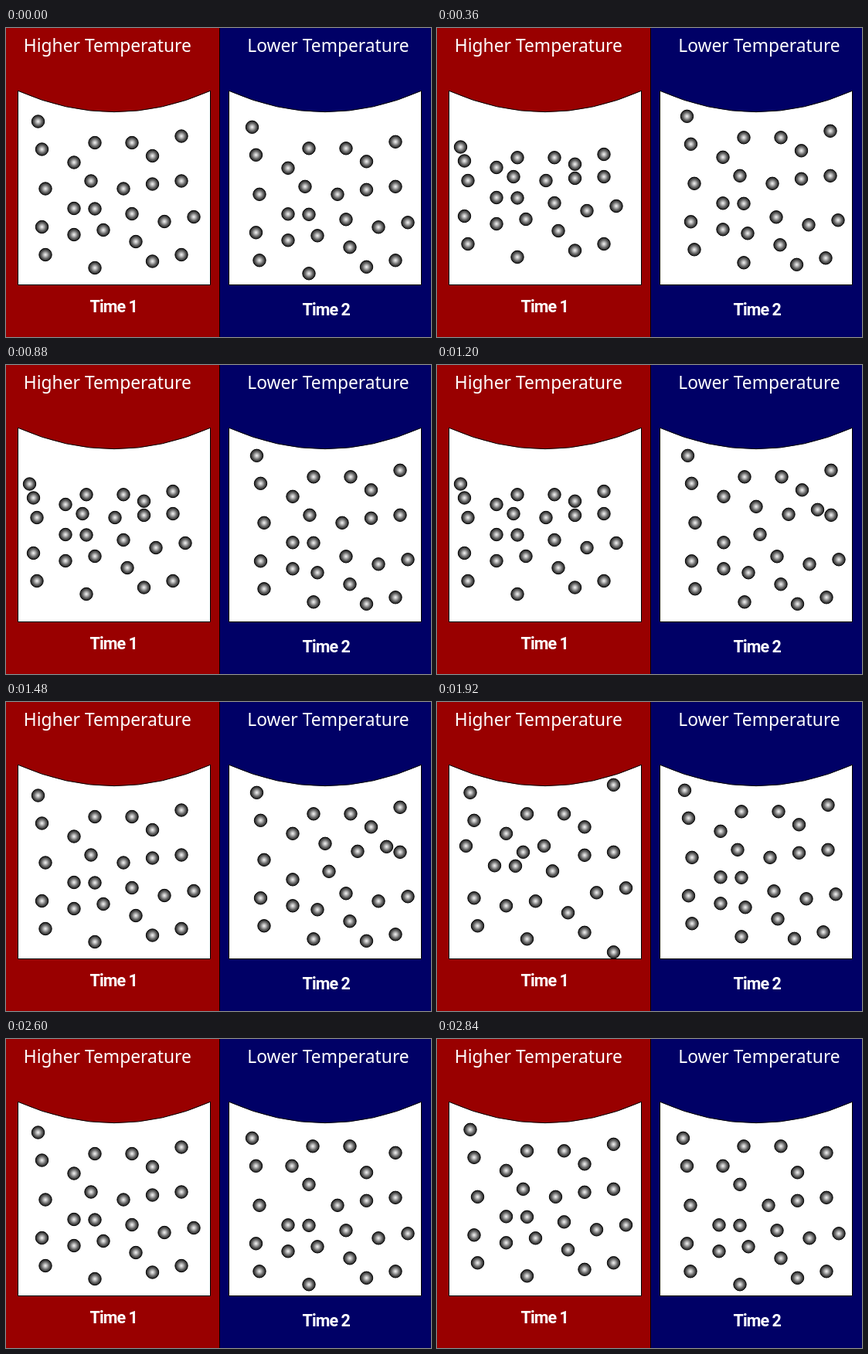
An HTML page that plays this animation: 550 by 400 pixels, repeating every 2.88 s.

```html
<!DOCTYPE html>
<html lang="en">
<head>
<meta charset="utf-8">
<title>Particles at two temperatures</title>
<style>
  html, body { margin: 0; width: 100%; height: 100%; overflow: hidden; }
  svg { display: block; width: 550px; height: 400px; }
  text { fill: #fff; }
  .title { font: 500 22.8px "Noto Sans", sans-serif; }
  .label { font: bold 21.5px Roboto, sans-serif; letter-spacing: -.9px; }
  .vessel { fill: #fff; stroke: #000; }
</style>
</head>
<body>
<svg viewBox="0 0 550 400">
  <defs>
    <radialGradient id="shade">
      <stop offset="0" stop-color="#f4f4f4"/>
      <stop offset=".25" stop-color="#c0c0c0"/>
      <stop offset=".65" stop-color="#606060"/>
      <stop offset="1" stop-color="#1c1c1c"/>
    </radialGradient>
    <path id="vessel" class="vessel" d="M.5 81.3Q125 136 249.5 81.3V332.5H.5Z"/>
  </defs>
  <rect width="276" height="400" fill="#900"/>
  <rect x="277" width="273" height="400" fill="#006"/>
  <rect x="276" width="1" height="400"/>
  <use href="#vessel" x="15"/>
  <use href="#vessel" x="288"/>
  <text class="title" x="22.8" y="30.5">Higher Temperature</text>
  <text class="title" x="312.3" y="30.5">Lower Temperature</text>
  <text class="label" x="108.5" y="368">Time 1</text>
  <text class="label" x="383.5" y="372">Time 2</text>
  <g id="hot"></g>
  <g id="cold" transform="translate(277 7.3)"></g>
</svg>
<script>
const FRAME = 40, FRAMES = 72;

// Starting layout, one column per row: x, then the heights on it.
const spread = [
  [41.5, 121], [46.5, 157, 257.5], [51, 208, 293.5],
  [88, 174, 233.5, 267.5], [110, 198], [115, 148.5, 234, 310.5],
  [126, 261.5], [152, 208], [163, 148.5, 240.5], [168, 276.5],
  [189.5, 165.5, 202, 302], [205, 250.5], [227, 140, 198, 293.5],
  [243, 244.5]
].flatMap(([x, ...heights]) => heights.map(y => [x, y]));

const everywhere = () => true;
const nudge = (pose, dx, dy, inside = everywhere) =>
  pose.map(([x, y]) => inside(x, y) ? [x + dx, y + dy] : [x, y]);

// Hot side: four poses in quick turn.
const raised = nudge(spread, 1.5, -3.7);
const crowded = spread.map(([x, y]) => [x - 11, y - 14 + Math.max(0, 215 - y) / 2]);
const swept = nudge(raised, -15, -18, (x, y) => x < 180 && y > 200 && y < 240);
const lowered = nudge(swept, 0, 34, (x, y) => x > 220 && y > 280);
const scattered = nudge(lowered, 0, -29, (x, y) => x > 220 && y < 150);
const hotCycle = [spread, crowded, raised, scattered];

// Cold side: each pose is held for a while.
const upperMiddle = (x, y) => x > 80 && x < 170 && y < 200;
const middle = (x, y) => x > 100 && x < 200 && y > 180 && y < 230;
const drifted = nudge(spread, 6, -11, (x, y) => x < 120 || y < 240);
const settled = nudge(drifted, -4, -3);
const coldSteps = [
  [0, spread],
  [5, nudge(drifted, -1, -3)],
  [14, settled],
  [18, drifted],
  [30, nudge(drifted, 20, -11, middle)],
  [43, settled],
  [57, nudge(spread, 22, -20, upperMiddle)],
  [65, nudge(spread, 5, -17, upperMiddle)]
];

function makeParticles(id) {
  const group = document.getElementById(id);
  return spread.map(() => {
    const dot = document.createElementNS(group.namespaceURI, "circle");
    dot.setAttribute("r", 8.2);
    dot.setAttribute("fill", "url(#shade)");
    dot.setAttribute("stroke", "#000");
    return group.appendChild(dot);
  });
}

function place(dots, pose) {
  dots.forEach((dot, i) => {
    dot.setAttribute("cx", pose[i][0]);
    dot.setAttribute("cy", pose[i][1]);
  });
}

const hot = makeParticles("hot"), cold = makeParticles("cold");
let shown = -1;

function draw() {
  const frame = Math.floor(performance.now() / FRAME) % FRAMES;
  if (frame !== shown) {
    shown = frame;
    // The hot side pauses for one frame early in each loop.
    const beat = frame < 12 ? frame : frame - 1;
    place(hot, hotCycle[beat % 4]);
    place(cold, coldSteps.filter(([start]) => start <= frame).pop()[1]);
  }
  requestAnimationFrame(draw);
}
draw();
</script>
</body>
</html>
```
